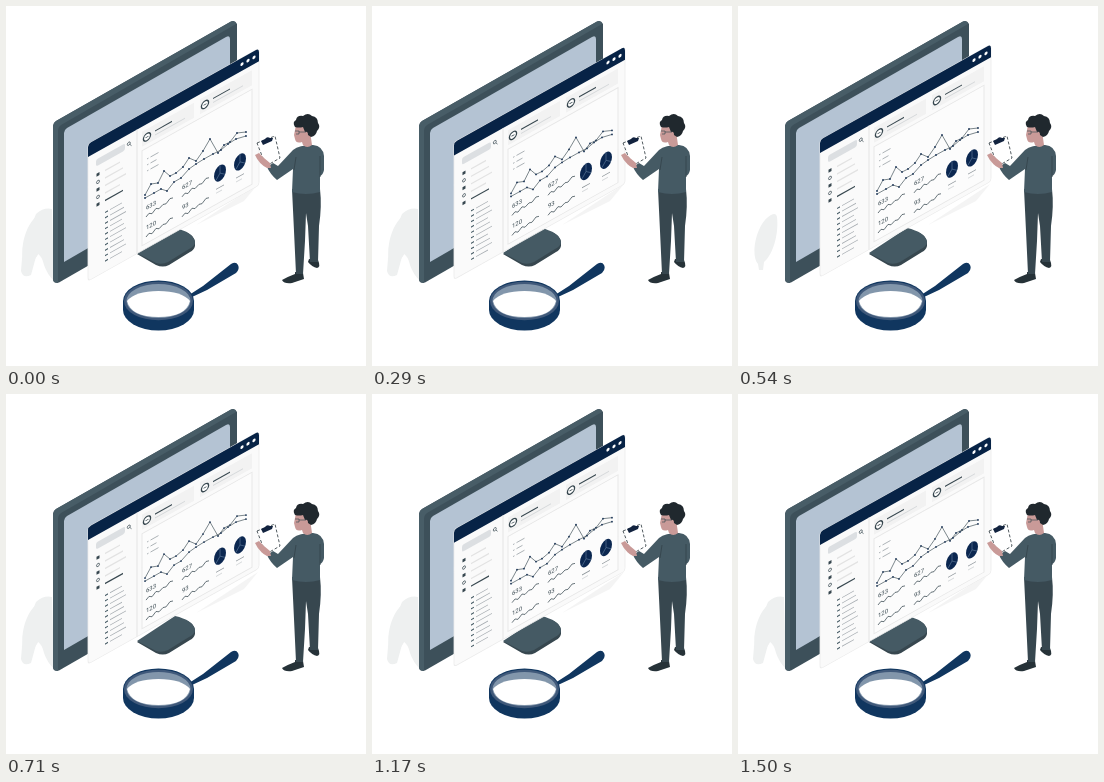
Write an HTML page that moves like this. It is 360 by 360 pixels and loops after 1540 ms.

```html
<!DOCTYPE html>
<html lang="en">
<head>
<meta charset="utf-8">
<style>
  html, body { margin: 0; width: 100%; height: 100%; overflow: hidden; background: #fff; }
  svg { display: block; width: 100vw; height: 100vh; }
  text { font: 6px Roboto, sans-serif; fill: #37474f; }
  .line { fill: none; stroke: #37474f; stroke-width: .65; stroke-linejoin: round; }
</style>
</head>
<body>
<svg viewBox="0 0 360 360">
  <g id="plant" fill="#eef0f0">
    <path d="M21 264L20 258C12 250 18 217 33 209Q38 206 39 211C41 228 35 249 26 256L25 264Z"/>
    <path id="leaf" d="M30 208Q38 201 46 203L48 275Q41 268 38 259Q36 250 31 247L25 269Q17 273 15 265L17 240Z"/>
  </g>

  <g id="monitor">
    <path d="M131 248L172 224Q188 227 189 236V240Q188 244 184 246L163 259Q157 262 150 259Z" fill="#37474f"/>
    <path d="M131 247L169 222Q187 226 189 236Q189 240 183 243L162 256Q156 259 150 257Z" fill="#455a64"/>
    <path d="M47 120Q47 117 50 115L225 15.500Q229 14 231 18V174L53 276.500Q47 278 47 273Z" fill="#3d505a"/>
    <path d="M47 120Q47 117 50 115L225 15.500Q229 14 230 18L55 119Q52 121 52 125V277Q47 277 47 272Z" fill="#485d67"/>
    <path d="M58 127Q58 124 61 122L220 31Q224 29 224 33V160L58 256Z" fill="#b4c3d3"/>
  </g>
  <path d="M190 219L252 178L238 195L210 209Z" fill="#f4f4f4"/>

  <g id="panel">
    <g transform="matrix(1 -.56 0 1 82 138)">
      <path d="M0 3Q0 0 3 0H168Q171 0 171 4V134Q171 137 168 137H3Q0 137 0 134Z" fill="#fafafa" stroke="#ececec" stroke-width=".8"/>
      <path d="M0 12V3Q0 0 3 0H168Q171 0 171 4V13H0Z" fill="#072346"/>
      <g fill="#fff"><circle cx="154" cy="6.300" r="1.600"/><circle cx="160" cy="6.300" r="1.600"/><circle cx="166" cy="6.300" r="1.600"/></g>
      <path d="M49 13V137" stroke="#e4e4e4"/>
      <rect x="8" y="20" width="29" height="7" rx="2" fill="#dcdfe2"/>
      <circle cx="40.800" cy="22.500" r="1.500" class="line"/><path d="M42 24l1.500 2" class="line"/>
      <g id="menu"></g>
      <g id="cards"></g>
      <rect x="54" y="37" width="110" height="95" fill="#fcfcfc" stroke="#e8e8e8"/>
      <path d="M59 48h1.500m2 0h8M59 54h1.500m2 0h6M59 60h1.500m2 0h8" class="line" stroke-opacity=".55"/>
      <g id="stats"></g>
      <g id="pies"></g>
    </g>
    <g id="chart"></g>
  </g>

  <g id="magnifier">
    <path d="M183 289L197 280L225 258Q230 255 232 259Q234 263 230 267L201 284L186 291Z" fill="#10365f"/>
    <path d="M117 295A35.500 20.500 0 0 1 188 295V304A35.500 20.500 0 0 1 117 304Z" fill="#10365f"/>
    <ellipse cx="152.500" cy="295" rx="34.500" ry="19.300" fill="#40597a"/>
    <ellipse cx="152.500" cy="295" rx="32" ry="17" fill="#8296ab"/>
    <path d="M121 295Q129 285 152.500 285T184 295Q180 311 152.500 311T121 295Z" fill="#fff"/>
  </g>

  <g id="man">
    <path d="M289 266L297 267L298 273L286 277Q278 278 276 274Q281 271 289 268Z" fill="#263238"/>
    <path d="M303 253L312 254Q315 261 311 262Q306 261 302 256Z" fill="#263238"/>
    <path d="M286 183L314 183Q316 200 313 220L312 256L304 256L302 220L300 207L299 235L297 268L290 268L288 225Z" fill="#37474f"/>
    <path d="M287 144Q293 139 307 139Q317 140 318 150V164Q317 169 314 170L314 186Q300 190 286 186L287 163L271 174Q264 168 261 161L267 157L272 160Z" fill="#455a64"/>
    <path d="M314 171V150M288 164L290 151" stroke="#37474f" fill="none"/>
    <path d="M251 137L269 130L274 152L260 160Z" fill="#fff" stroke="#263238" stroke-width=".8" stroke-dasharray="3 2"/>
    <path d="M255 135L259 133Q261 130 264 132L267 132L266 135L257 139Z" fill="#12233f"/>
    <path d="M249 149L253 147L258 152L264 157L265 162L261 162Q253 158 249 149Z" fill="#c99a98"/>
    <path d="M290 119L303 118L306 139Q301 143 297 139L296 136Q290 138 289 133L288 129Z" fill="#c99a98"/>
    <path d="M289 121Q286 116 290 114Q291 109 297 110Q302 106 306 110Q312 111 312 117Q315 121 311 125Q310 130 305 131L302 129Q302 125 299 126L297 121Q293 122 289 121Z" fill="#20282e"/>
    <path d="M289 125h4v3h-3m3-2h7" class="line"/>
  </g>
</svg>
<script>
const LOOP = 1540, LIFT = 5;
const $ = id => document.getElementById(id);
const repeat = (n, draw) => Array.from({ length: n }, (_, i) => draw(i)).join('');
const stroke = (d, color, width) => `<path d="${d}" fill="none" stroke="${color}" stroke-width="${width}"/>`;

$('menu').innerHTML = repeat(5, i => {
  const y = 36 + i * 7.5;
  const icon = i % 2
    ? `<circle cx="10" cy="${y}" r="1.5" class="line"/>`
    : `<rect x="8.5" y="${y - 1.5}" width="3" height="3" fill="#37474f"/>`;
  return icon + stroke(`M17 ${y}h${i === 4 ? 18 : 15 + i % 3 * 3}`, i === 4 ? '#37474f' : '#e2e2e2', 1.4);
}) + repeat(10, i => {
  const y = 78 + i * 5.4;
  return stroke(`M17 ${y}h3`, '#455a64', 1.2) + stroke(`M22 ${y}h${12 + i % 3 * 2}`, '#a5abb0', .8);
});

$('cards').innerHTML = repeat(2, i => {
  const x = 54 + i * 58;
  return `<rect x="${x}" y="18" width="52" height="15" fill="#f2f2f2"/>
    <circle cx="${x + 5}" cy="26" r="3.6" fill="#fff" stroke="#37474f" stroke-width="1.3"/>` +
    stroke(`M${x + 3.5} 26h3`, '#37474f', .8) +
    stroke(`M${x + 13} 24.5h17`, '#37474f', 1.2) +
    stroke(`M${x + 13} 28.5h30`, '#d5d8da', 1);
});

$('stats').innerHTML = [633, 627, 120, 93].map((value, i) => {
  const x = 58 + i % 2 * 36, y = 98.5 + (i >> 1) * 20;
  return `<text x="${x}" y="${y}">${value}</text>
    <path class="line" d="M${x} ${y + 7}l3 -2 3 2 4 -3 3 2 4 -2 3 1 4 -3 3 1"/>`;
}).join('');

$('pies').innerHTML = repeat(2, i => {
  const x = 132 + i * 20;
  return `<ellipse cx="${x}" cy="103" rx="6" ry="8" fill="#0b2750"/>` +
    stroke(`M${x} 95v8l5 4m-5 -4l-4 5`, '#5c7797', .6) +
    stroke(`M${x - 4} 117h8`, '#8a9297', .8) + stroke(`M${x - 4} 121h6`, '#d5d8da', 1);
});

const series = [
  '139,189 145,178 152,177 158,165 164,170 170,167 177,161 183,152 190,155 197,145 204,133 212,147 218,139 224,136 231,127 240,126',
  '139,192 148,187 155,183 161,185 168,176 175,172 183,163 190,158 198,153 207,148 215,144 222,138 230,133 240,130'
];
$('chart').innerHTML = series.map(points =>
  `<polyline class="line" points="${points}"/>` +
  points.split(' ').map(p => {
    const [x, y] = p.split(',');
    return `<circle cx="${x}" cy="${y}" r=".9" fill="#1c3557"/>`;
  }).join('')
).join('');

function render(now) {
  const t = now % LOOP;
  const rise = (1 - Math.cos(t / LOOP * 2 * Math.PI)) / 2;
  $('panel').setAttribute('transform', `translate(0 ${-LIFT * rise})`);
  const leafShown = t < 500 || (t > 660 && t < 800) || t > 1080;
  $('leaf').setAttribute('opacity', leafShown ? 1 : 0);
  requestAnimationFrame(render);
}
render(performance.now());
</script>
</body>
</html>
```
